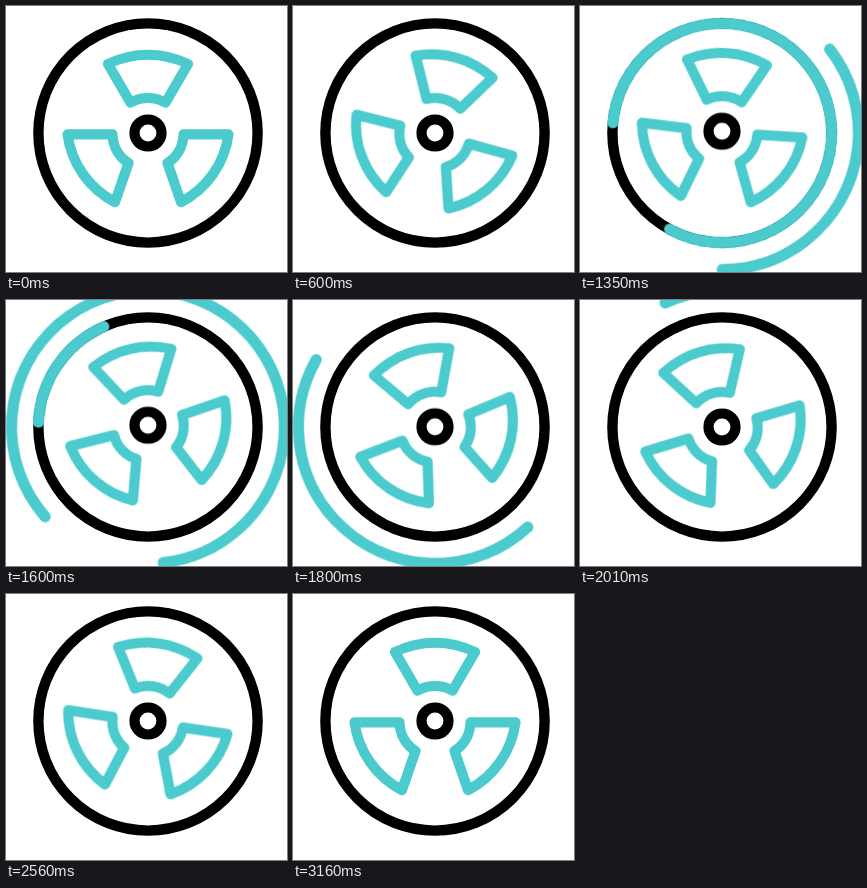
An HTML page for the animation above (3.23 s loop, 281 by 266 pixels).

```html
<!DOCTYPE html>
<html lang="en">
<head>
<meta charset="utf-8">
<title>Radiation symbol</title>
<style>
  html, body { margin: 0; width: 100%; height: 100%; overflow: hidden; background: #fff; }
  svg { display: block; width: 281px; height: 266px; }

  .line { fill: none; stroke: #000; stroke-width: 10.2; stroke-linecap: round; stroke-linejoin: round; }
  .teal { stroke: #4bcbcd; }
  .ring { stroke-width: 10.4; }

  .core, .blade, .wave { animation: 3.23s infinite; }
  .core { animation-name: bob; }
  .blade { animation-timing-function: cubic-bezier(.37, 0, .63, 1); }
  .top { animation-name: swing-top; }
  .right { animation-name: swing-right; }
  .left { animation-name: swing-left; }
  .wave { opacity: 0; stroke-width: 11.2; animation-name: sweep; animation-timing-function: linear; }
  .outer { animation-delay: .3s; }

  @keyframes bob {
    0%, 34%, 60.4%, 100% { transform: translateY(0); }
    41.8%, 49.5% { transform: translateY(-1.8px); }
  }

  /* The blades sway with decaying swings, slightly out of step. */
  @keyframes swing-right {
    0%, 96.9%, 100% { transform: rotate(0deg); }
    31.58% { transform: rotate(24deg); }
    53.87% { transform: rotate(-23deg); }
    81.73% { transform: rotate(9deg); }
  }
  @keyframes swing-top {
    0%, 96.9%, 100% { transform: rotate(0deg); }
    29.1% { transform: rotate(22.5deg); }
    56.97% { transform: rotate(-20deg); }
    83.59% { transform: rotate(10deg); }
  }
  @keyframes swing-left {
    0%, 96.9%, 100% { transform: rotate(0deg); }
    32.2% { transform: rotate(22.5deg); }
    55.73% { transform: rotate(-21deg); }
    82.97% { transform: rotate(10deg); }
  }

  /* Rotation places the tail; the dash is the arc length in degrees. */
  @keyframes sweep {
    0%, 23.52% { opacity: 0; transform: rotate(0deg); stroke-dasharray: 0 720; }
    23.53% { opacity: 1; transform: rotate(0deg); stroke-dasharray: 0 720; }
    26.63% { transform: rotate(2deg); stroke-dasharray: 23 720; }
    28.79% { transform: rotate(14deg); stroke-dasharray: 54 720; }
    30.96% { transform: rotate(36.5deg); stroke-dasharray: 95 720; }
    32.51% { transform: rotate(51.5deg); stroke-dasharray: 127 720; }
    36.38% { transform: rotate(125deg); stroke-dasharray: 240 720; }
    40.25% { transform: rotate(228deg); stroke-dasharray: 305 720; }
    41.8% { transform: rotate(274deg); stroke-dasharray: 294 720; }
    45.67% { transform: rotate(462deg); stroke-dasharray: 188 720; }
    49.54% { transform: rotate(632deg); stroke-dasharray: 64 720; }
    52.94% { transform: rotate(695deg); stroke-dasharray: 23 720; }
    55.41% { opacity: 1; transform: rotate(720deg); stroke-dasharray: 0 720; }
    55.42%, 100% { opacity: 0; transform: rotate(720deg); stroke-dasharray: 0 720; }
  }
</style>
</head>
<body>
<svg viewBox="0 0 281 266">
  <defs>
    <path id="side" d="M80.5 1.3A90 90 0 0 1 33 69.2L19.5 30A35 35 0 0 0 35.5 1.3Z"/>
  </defs>
  <g class="line" transform="translate(142 127)">
    <circle class="ring" r="109.6"/>
    <g class="teal" transform="rotate(-90)">
      <circle class="wave" r="109.6" pathLength="360"/>
      <circle class="wave outer" r="136.5" pathLength="360"/>
    </g>
    <g class="core">
      <circle r="13.5"/>
      <g class="teal">
        <path class="blade top" d="M-40-69A91 91 0 0 1 40-69L17.5-30.3A35 35 0 0 0-17.5-30.3Z"/>
        <g class="blade right"><use href="#side"/></g>
        <g class="blade left"><use href="#side" transform="scale(-1 1)"/></g>
      </g>
    </g>
  </g>
</svg>
</body>
</html>
```
